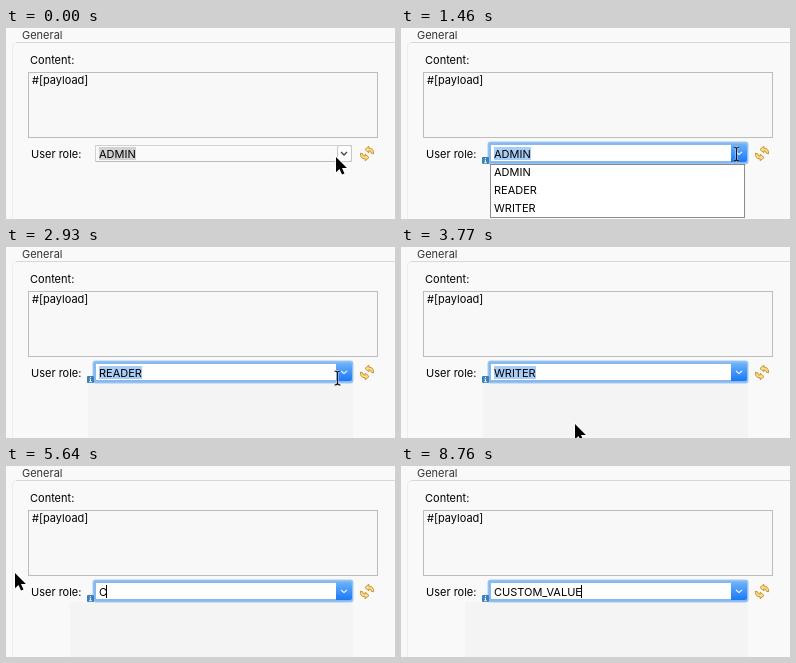
Recreate the animation shown at these times as an HTML page. Size 389 by 191 pixels, loop 8860 ms.

```html
<!DOCTYPE html>
<html lang="en">
<head>
<meta charset="utf-8">
<title>User role combo box</title>
<style>
  html, body { margin: 0; width: 100%; height: 100%; overflow: hidden; background: #f9f9f9; }
  svg { display: block; width: 389px; height: 191px; }
  text { font: 11px Inter, Roboto, "Open Sans", sans-serif; fill: #000; white-space: pre; }
  .title { fill: #333; }
</style>
</head>
<body>
<svg viewBox="0 0 389 191">
  <defs>
    <linearGradient id="blue" x2="0" y2="1">
      <stop offset="0" stop-color="#6cb3fa"/>
      <stop offset="1" stop-color="#1a78f8"/>
    </linearGradient>
  </defs>
  <rect width="389" height="191" fill="#f9f9f9"/>
  <text class="title" x="16" y="11">General</text>
  <path d="M6.5 191V18.5Q6.5 14.5 10.5 14.5" fill="none" stroke="#ededed"/>
  <path d="M10 14.5H389" stroke="#d8d8d8"/>
  <text x="24" y="36">Content:</text>
  <rect x="22.5" y="44.5" width="349" height="65" fill="#f8f8f8" stroke="#bdbdbd"/>
  <text x="26" y="56">#[payload]</text>
  <text x="25" y="130">User role:</text>

  <g fill="#fae08c" stroke="#c48a22" stroke-width=".9" stroke-linejoin="round">
    <path id="turn" d="M359 121.5L362.8 118.2V120.2Q367.8 120 367.6 125.8L365.3 125.2Q365.6 122.8 362.8 122.8V124.8Z"/>
    <use href="#turn" transform="rotate(180 361 125.5)"/>
  </g>

  <rect id="shade" y="136" height="55" fill="#f4f4f4"/>

  <g id="idle">
    <rect x="89.5" y="117.5" width="256" height="16" fill="#fafafa" stroke="#d0d0d0"/>
    <path d="M90 133.5H345" stroke="#b9b9b9"/>
    <rect x="331.5" y="117.5" width="14" height="16" rx="2.5" fill="#fff" stroke="#c6c6c6"/>
    <path d="M335 124l3 3 3-3" fill="none" stroke="#444" stroke-width="1.3"/>
  </g>
  <g id="focus">
    <rect x="86.5" y="113.5" width="261" height="23" rx="3" fill="#a3caf3"/>
    <rect x="87.5" y="114.5" width="259" height="21" rx="2" fill="#86b9ee"/>
    <rect x="90" y="117" width="240" height="16" fill="#fff"/>
    <path d="M330 116H343.5Q346 116 346 118.5V131.5Q346 134 343.5 134H330Z" fill="url(#blue)"/>
    <path d="M335 123.8l3 2.8 3-2.8" fill="none" stroke="#fff" stroke-width="1.1"/>
    <rect x="81" y="129" width="7" height="7" rx="1" fill="#3d7fb8"/>
    <path d="M84.5 130v1M83.5 132h1v2.6M83 134.8h3" fill="none" stroke="#fff" stroke-width=".9"/>
  </g>
  <rect id="mark" x="93" y="119" height="13"/>
  <text id="value" x="93" y="130"></text>
  <path id="caret" d="M0 119V132" stroke="#000"/>

  <g id="menu">
    <rect x="89.5" y="136.5" width="254" height="53" fill="#fff" stroke="#8c8c8c"/>
    <rect id="hot" x="90" width="253" height="17" fill="#1a6ad8"/>
    <text x="93" y="148">ADMIN</text>
    <text x="93" y="166">READER</text>
    <text x="93" y="184">WRITER</text>
  </g>

  <path id="arrow" d="M0 0V15.2L3.5 12L6 17.5L8.5 16.5L6 11.1H10.9Z" fill="#000" stroke="#fff" stroke-width="1.8" stroke-linejoin="round" paint-order="stroke"/>
  <g id="beam" fill="none">
    <path id="bar" d="M-3 -7Q0 -7 0 -5V5Q0 7 -3 7M3 -7Q0 -7 0 -5M0 5Q0 7 3 7" stroke="#fff" stroke-opacity=".6" stroke-width="2.4"/>
    <path d="M-3 -7Q0 -7 0 -5V5Q0 7 -3 7M3 -7Q0 -7 0 -5M0 5Q0 7 3 7" stroke="#111" stroke-width="1.1"/>
  </g>
</svg>
<script>
const LOOP = 8860;
const $ = id => document.getElementById(id);
const show = (id, on) => $(id).setAttribute('display', on ? 'inline' : 'none');
const set = (id, attrs) => { for (const k in attrs) $(id).setAttribute(k, attrs[k]); };

// Latest entry that has started: [start, ...data]
const at = (track, t) => track.filter(k => k[0] <= t).pop();

const pointer = [
  [0, 'arrow', 330, 129], [210, 'arrow', 332, 127], [420, 'arrow', 333, 125], [630, 'arrow', 334, 124],
  [1460, 'beam', 335.5, 126], [1880, 'arrow', 322, 138], [2090, 'arrow', 270, 146],
  [2300, 'arrow', 225, 155], [2510, 'arrow', 205, 160], [2930, 'beam', 331.5, 131],
  [3140, 'beam', 336, 126], [3350, 'arrow', 240, 158], [3560, 'arrow', 174, 177],
  [3980, 'arrow', 162, 172], [4190, 'arrow', 138, 162], [4400, 'arrow', 105, 147],
  [4610, 'arrow', 66, 138], [4810, 'arrow', 36, 122], [5020, 'arrow', 16, 108],
  [5220, 'arrow', 9, 107], [8140, 'none', 0, 0]
];
// Open menu with its highlighted row, -1 for none
const menu = [
  [0, false, -1], [1460, true, -1], [2090, true, 0], [2300, true, 1], [2720, false, -1],
  [3140, true, -1], [3350, true, 1], [3560, true, 2], [3770, false, -1]
];
const picked = [[0, 'ADMIN'], [2720, 'READER'], [3770, 'WRITER']];
const typed = [
  [5640, 1], [6270, 2], [6480, 4], [6680, 6],
  [7100, 7], [7310, 9], [7510, 10], [7720, 12]
];
const caret = [[0, false], [5640, true], [8350, false], [8760, true]];

function draw(t) {
  const key = at(typed, t);
  const focused = t >= 1460;
  show('idle', !focused);
  show('focus', focused);

  $('value').textContent = key ? 'CUSTOM_VALUE'.slice(0, key[1]) : at(picked, t)[1];
  const width = Math.round($('value').getComputedTextLength());
  show('mark', !key);
  set('mark', { width, fill: focused ? '#a9cdf7' : '#d2d2d2' });
  show('caret', at(caret, t)[1]);
  set('caret', { transform: `translate(${92.5 + width})` });

  const [, open, row] = at(menu, t);
  show('menu', open);
  show('hot', row >= 0);
  set('hot', { y: 136 + 18 * row });
  document.querySelectorAll('#menu text').forEach((el, i) => { el.style.fill = i === row ? '#fff' : '#000'; });

  const left = t < 3980 ? 82 : 64;
  show('shade', t >= 2720);
  set('shade', { x: left, width: 347 - left });

  const [, kind, x, y] = at(pointer, t);
  for (const id of ['arrow', 'beam']) {
    show(id, kind === id);
    set(id, { transform: `translate(${x} ${y})` });
  }
}

const start = performance.now();
function tick() {
  draw((performance.now() - start) % LOOP);
  requestAnimationFrame(tick);
}
tick();
</script>
</body>
</html>
```
